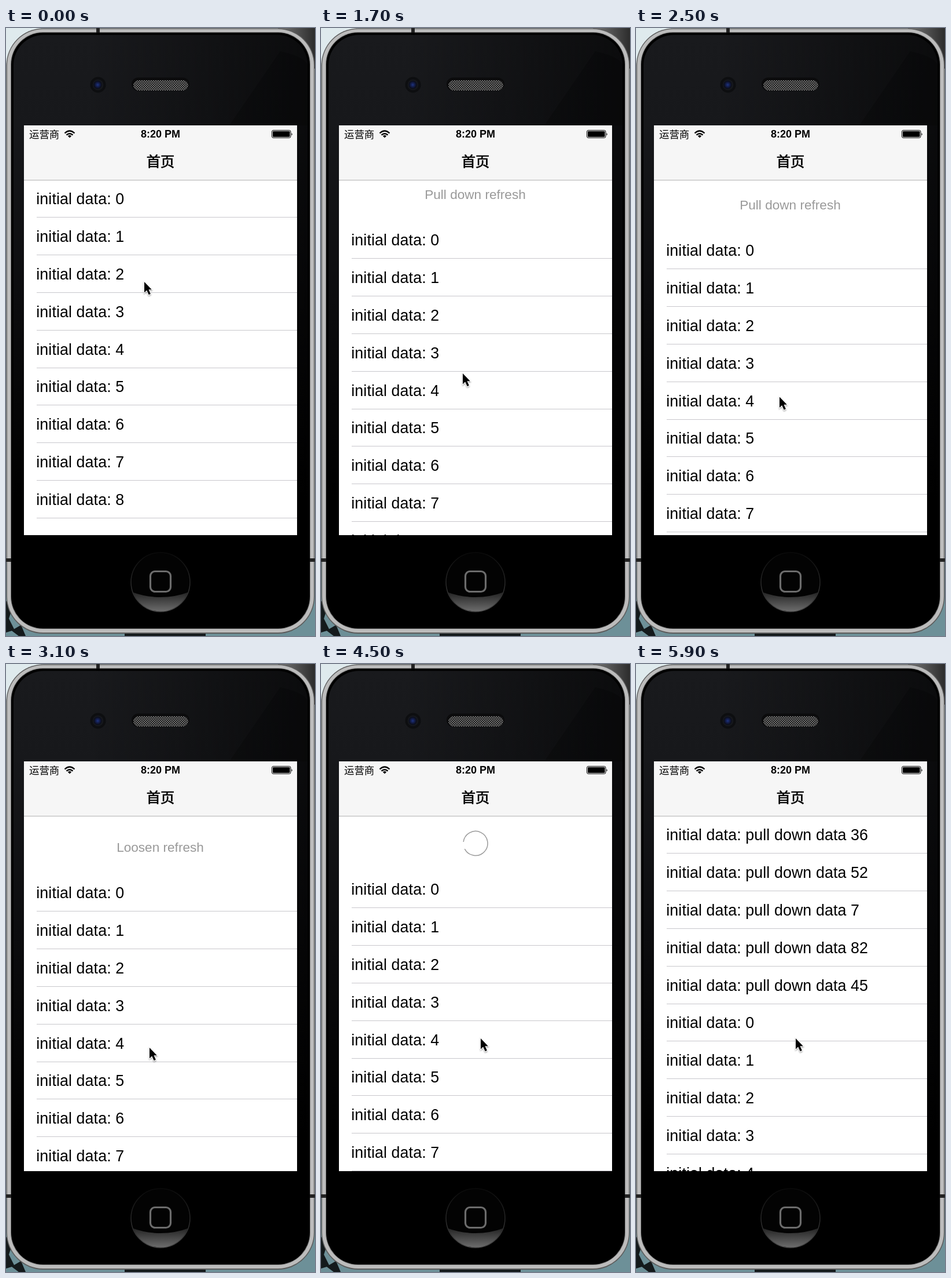
An HTML page that plays this animation: 534 by 1049 pixels, repeating every 6.3 s.

```html
<!DOCTYPE html>
<html lang="en">
<head>
<meta charset="utf-8">
<title>Pull to refresh</title>
<style>
  html, body { margin: 0; width: 100%; height: 100%; overflow: hidden; background: #000; }
  svg { display: block; width: 534px; height: 1049px; }
  text { font-family: "Liberation Sans", Arial, sans-serif; }
  .cjk { font-family: "Noto Sans CJK SC", "Noto Sans CJK", sans-serif; }
  .mid { text-anchor: middle; }
  #rows text { font-size: 26.8px; letter-spacing: .1px; }
  #rows path { stroke: #c8c7cc; }
  #hint { font-size: 22.6px; fill: #999; }
</style>
</head>
<body>
<svg viewBox="0 0 534 1049">
  <defs>
    <linearGradient id="face" x2="0" y2="1">
      <stop offset="0" stop-color="#191a1d"/>
      <stop offset=".15" stop-color="#17181b"/>
      <stop offset=".45" stop-color="#0c0c0e"/>
      <stop offset=".78" stop-color="#000"/>
    </linearGradient>
    <linearGradient id="shade">
      <stop offset=".25" stop-color="#000" stop-opacity="0"/>
      <stop offset="1" stop-color="#000" stop-opacity=".55"/>
    </linearGradient>
    <linearGradient id="crescent" x2="0" y2="1">
      <stop offset="0" stop-color="#1c1c1c"/>
      <stop offset="1" stop-color="#747474"/>
    </linearGradient>
    <linearGradient id="ring" x2="0" y2="1">
      <stop offset="0" stop-color="#0a0a0a"/>
      <stop offset="1" stop-color="#444"/>
    </linearGradient>
    <linearGradient id="dusk">
      <stop offset="0" stop-color="#777"/>
      <stop offset="1" stop-color="#2c2c2c"/>
    </linearGradient>
    <radialGradient id="lens">
      <stop offset="0" stop-color="#1e3480"/>
      <stop offset=".5" stop-color="#131c48"/>
      <stop offset="1" stop-color="#090b14"/>
    </radialGradient>
    <pattern id="mesh" width="4" height="4" patternUnits="userSpaceOnUse">
      <rect width="4" height="4" fill="#1c1c1c"/>
      <circle cx="1" cy="1" r="1" fill="#888"/>
      <circle cx="3" cy="3" r="1" fill="#888"/>
    </pattern>
    <clipPath id="screen"><rect x="31" y="168" width="472" height="707"/></clipPath>
    <clipPath id="button"><circle cx="267" cy="956" r="50.5"/></clipPath>
    <filter id="drop" x="-50%" y="-50%" width="200%" height="200%">
      <feDropShadow dx="0" dy="1.5" stdDeviation="1.3" flood-opacity=".4"/>
    </filter>
  </defs>

  <!-- desktop behind the phone -->
  <rect width="534" height="1049" fill="#b9c6ca"/>
  <rect width="60" height="60" fill="#dfeaed"/>
  <rect x="470" width="64" height="70" fill="url(#dusk)"/>
  <rect y="920" width="534" height="129" fill="#6d9098"/>
  <path d="M0 988L10 1003L5 1019L14 1037L26 1030L34 1049H22L10 1040L0 1043ZM205 1049V1044H345V1049Z" fill="#141a1c"/>

  <!-- phone -->
  <rect x=".5" y=".5" width="533" height="1044.5" rx="64" fill="#5c5c5c"/>
  <rect x="2" y="2" width="530" height="1041" rx="62" fill="#bcbcbc"/>
  <rect x="8" y="7" width="518" height="1030" rx="56" fill="#777"/>
  <path d="M156 0h6v8h-6ZM0 915h9v6H0ZM525 915h9v6H525Z" fill="#222"/>
  <rect x="9" y="8" width="516" height="1028" rx="55" fill="#000"/>
  <rect x="13" y="12" width="508" height="1020" rx="52" fill="url(#face)"/>
  <rect x="13" y="12" width="508" height="1020" rx="52" fill="url(#shade)"/>
  <path d="M474 40L386 168H521V64Q518 50 474 40Z" fill="#000" opacity=".22"/>

  <circle cx="159" cy="98" r="13.5" fill="#0d0e10"/>
  <circle cx="159" cy="98" r="9.5" fill="#15171c"/>
  <circle cx="158.5" cy="98" r="7" fill="url(#lens)"/>
  <rect x="217" y="85.5" width="100" height="23" rx="11.5" fill="#0b0b0c"/>
  <rect x="220" y="90" width="95" height="18" rx="9" fill="url(#mesh)"/>

  <circle cx="267" cy="956" r="51" fill="#030303" stroke="url(#ring)" stroke-width="1.5"/>
  <path d="M210 970Q267 994 324 970V1010H210Z" fill="url(#crescent)" clip-path="url(#button)"/>
  <rect x="249.5" y="937.5" width="35" height="35" rx="8" fill="none" stroke="#6c6c6c" stroke-width="3.2"/>

  <!-- app -->
  <g clip-path="url(#screen)">
    <rect x="31" y="168" width="472" height="707" fill="#fff"/>
    <g id="list">
      <text id="hint" class="mid" x="266.5" y="223.5"></text>
      <path id="spinner" fill="none" stroke="#999" stroke-width="1.5"/>
      <g id="rows"></g>
    </g>
    <rect x="31" y="168" width="472" height="94" fill="#f6f6f6"/>
    <path d="M31 262.5H503" stroke="#b2b2b2"/>
    <text class="cjk" x="40" y="189.5" font-size="17.4">运营商</text>
    <path d="M101.5 181.5Q110 173.5 118.5 181.5M104.5 184.7Q110 179.7 115.5 184.7" fill="none" stroke="#000" stroke-width="2.3"/>
    <path d="M106.8 186.3Q110 183.7 113.2 186.3L110 189.6Z"/>
    <text class="mid" x="267" y="189.3" font-size="18" font-weight="700">8:20 PM</text>
    <rect x="459.5" y="176.5" width="32.5" height="13" rx="2.5" fill="none" stroke="#000"/>
    <rect x="461" y="178" width="29.5" height="10" rx="1.3"/>
    <path d="M493.500 181Q496 183.250 493.500 185.500Z"/>
    <text class="cjk mid" x="267" y="239" font-size="24.3" stroke="#000" stroke-width=".7">首页</text>
  </g>

  <g id="cursor" filter="url(#drop)">
    <path d="M0 0V18.5L4.2 14.5L7.7 22.2L10.900 20.800L7.500 13.200H12.800Z" stroke="#fff" stroke-width="1.8" paint-order="stroke"/>
  </g>
</svg>
<script>
const LOOP = 6300, STEP = 100, HELD = 94.4, ROW = 64.88;
const RELEASE = 3700, RELOAD = 5600, DONE = 5900;
const $ = id => document.getElementById(id);

const initial = Array.from({ length: 9 }, (_, i) => "initial data: " + i);
const loaded = [36, 52, 7, 82, 45].map(n => "initial data: pull down data " + n).concat(initial);

// time, x, y of the pointer tip
const track = [
  [300, 239, 438], [1000, 242, 513], [1700, 245, 596], [2500, 248, 636.5],
  [3100, 248, 662], [3600, 248, 662], [4300, 276, 646]
];

$("rows").innerHTML = loaded.map((_, i) => {
  const y = i * ROW;
  return `<text x="52.3" y="${304 + y}"></text><path d="M53 ${Math.round(326 + y) + .5}H503"/>`;
}).join("");
const labels = document.querySelectorAll("#rows text");

const clamp = v => Math.min(1, Math.max(0, v));
const ease = v => v * v * (3 - 2 * v);
const phase = (t, from, to) => ease(clamp((t - from) / (to - from)));

function pointer(t) {
  let i = 0;
  while (i < track.length - 2 && t > track[i + 1][0]) i++;
  const [t0, x0, y0] = track[i], [t1, x1, y1] = track[i + 1];
  const k = clamp((t - t0) / (t1 - t0));
  return [x0 + (x1 - x0) * k, y0 + (y1 - y0) * k];
}

// rubber-band resistance of the dragged list
function pull(y) {
  const d = 0.55 * Math.max(0, y - 455);
  return d / (1 + d / 850);
}

function offset(t, y) {
  if (t < RELEASE) return pull(y);
  if (t < RELOAD) return HELD + (pull(662) - HELD) * (1 - phase(t, RELEASE - STEP, RELEASE + 300));
  return HELD * (1 - phase(t, RELOAD, DONE));
}

function arc(turn) {
  const point = a => `${267 + 21 * Math.cos(a)} ${215.5 + 21 * Math.sin(a)}`;
  const start = (turn - .28) * 2 * Math.PI;
  return `M${point(start)}A21 21 0 1 1 ${point(start + 1.81 * Math.PI)}`;
}

function draw(t) {
  const [x, y] = pointer(t), shift = offset(t, y);
  $("cursor").setAttribute("transform", `translate(${x} ${y})`);
  $("list").setAttribute("transform", `translate(0 ${Math.round(shift)})`);
  $("hint").textContent = t >= RELEASE ? "" : shift > HELD ? "Loosen refresh" : "Pull down refresh";
  $("spinner").setAttribute("d", t >= RELEASE && t < RELOAD ? arc((t - RELEASE) / 1000) : "");
  const data = t < RELOAD ? initial : loaded;
  labels.forEach((label, i) => label.textContent = data[i] || "");
}

function frame() {
  draw(Math.floor(performance.now() % LOOP / STEP) * STEP);
  requestAnimationFrame(frame);
}
frame();
</script>
</body>
</html>
```
